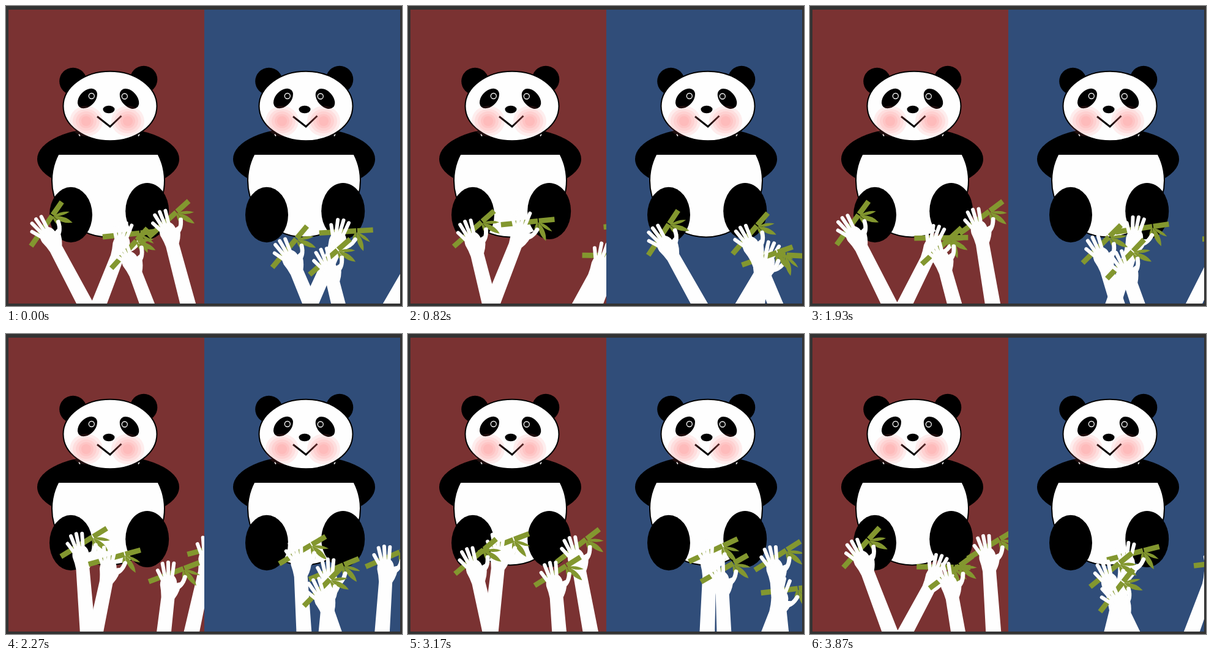
Write an HTML page that moves like this. It is 647x490 px and loops after 3950 ms.

```html
<!DOCTYPE html>
<html lang="en">
<head>
<meta charset="utf-8">
<title>Pandas and bamboo</title>
<style>
  html, body { margin: 0; width: 100%; height: 100%; overflow: hidden; background: #333; }
  svg { display: block; }
</style>
</head>
<body>
<svg width="647" height="490">
  <defs>
    <g id="blush" fill="#f77" fill-opacity=".12">
      <ellipse rx="27" ry="25"/>
      <ellipse rx="22" ry="20"/>
      <ellipse rx="17" ry="16"/>
      <ellipse rx="12" ry="11.5"/>
      <ellipse rx="8" ry="8"/>
    </g>

    <g id="panda">
      <circle cx="109.5" cy="123" r="22.3"/>
      <circle cx="225" cy="120" r="22.3"/>
      <ellipse cx="167" cy="250" rx="116" ry="52"/>
      <path d="M85.5 242A92 92.5 0 1 0 248.5 242Z" fill="#fefefe" stroke="#000" stroke-width="2"/>
      <path d="M119 209.5l2 3M218 209.5l-2 3" stroke="#fefefe" stroke-width="1.5"/>
      <ellipse cx="106" cy="341" rx="35" ry="45.3"/>
      <ellipse cx="230.7" cy="335" rx="35.5" ry="46"/>
      <ellipse cx="170" cy="163.5" rx="76.5" ry="56.8" fill="#fefefe" stroke="#000" stroke-width="2"/>
      <ellipse rx="19" ry="12.5" transform="translate(133 151) rotate(-46)"/>
      <ellipse rx="19" ry="12.5" transform="translate(201.5 151.5) rotate(48)"/>
      <g fill="none" stroke="#fefefe" stroke-width="1.3">
        <circle cx="139.8" cy="147" r="4.5"/>
        <circle cx="193.8" cy="147.5" r="4.5"/>
      </g>
      <ellipse cx="168" cy="169" rx="9.5" ry="6.2"/>
      <path d="M149 180.5L170 197L188.5 179.5" fill="none" stroke="#000" stroke-width="3"/>
      <use href="#blush" x="131" y="188"/>
      <use href="#blush" x="199" y="188"/>
    </g>

    <!-- Upright arm; the origin is its pivot -->
    <g id="arm">
      <g fill="#83972f">
        <path transform="translate(-34 -135) rotate(-27)" d="M0-4.3H60.5V4.3H0ZM62.2-4.3H88V4.3H62.2Z"/>
        <path d="M20-161Q28-148 25-139Q16-149 20-161Z"/>
        <path d="M21-161Q39-154 44-137Q27-143 21-161Z"/>
        <path d="M22-161Q37-163 48-155Q34-153 22-161Z"/>
      </g>
      <g fill="#fefefe" stroke="#fefefe" stroke-linecap="round">
        <path d="M-13.5 20L-11-112Q-12-122-15-132Q-16-143-9-149H6Q11-145 12-138L18-140Q20-127 11-112L12.5 20Z" stroke="none"/>
        <path d="M-10-137L-21.5-155M-8-144L-15-167M-3-146L-6-170M3-145L3.5-169.5" stroke-width="6"/>
        <path d="M11-129Q21-133 24-149" fill="none" stroke-width="6.8"/>
      </g>
    </g>
  </defs>

  <svg id="left" x="4" y="6" width="320" height="480" viewBox="4 6 320 480">
    <rect x="4" y="6" width="320" height="480" fill="#7a3232"/>
    <use href="#panda"/>
  </svg>
  <svg id="right" x="324" y="6" width="320" height="480" viewBox="324 6 320 480">
    <rect x="324" y="6" width="320" height="480" fill="#304d79"/>
    <use href="#panda" x="320"/>
  </svg>
</svg>

<script>
const LOOP = 3950, LAST_POSE = 3870, SWING = 1850, REACH = 30;

// Pivot x, pivot y, moment (ms) of the leftmost pose; in paint order
const arms = {
  left: [[134.5, 495.3, 30], [141, 515.3, 1063], [301, 499, 1620], [252, 542.5, 1710]],
  right: [[488.5, 508, 830], [519, 538, 1742], [562, 561.3, 245], [613, 517, 940]]
};

const swingers = Object.entries(arms).flatMap(([panel, list]) =>
  list.map(([x, y, start]) => {
    const node = document.createElementNS("http://www.w3.org/2000/svg", "use");
    node.setAttribute("href", "#arm");
    document.getElementById(panel).append(node);
    return { node, x, y, start };
  }));

// Constant speed back and forth between -REACH and +REACH
function tilt(time, start) {
  const phase = ((time - start) / SWING + 2) % 1;
  return REACH - 4 * REACH * Math.abs(phase - 0.5);
}

function draw() {
  const time = Math.min(performance.now() % LOOP, LAST_POSE);
  for (const { node, x, y, start } of swingers) {
    node.setAttribute("transform", `translate(${x} ${y}) rotate(${tilt(time, start)})`);
  }
  requestAnimationFrame(draw);
}
draw();
</script>
</body>
</html>
```
